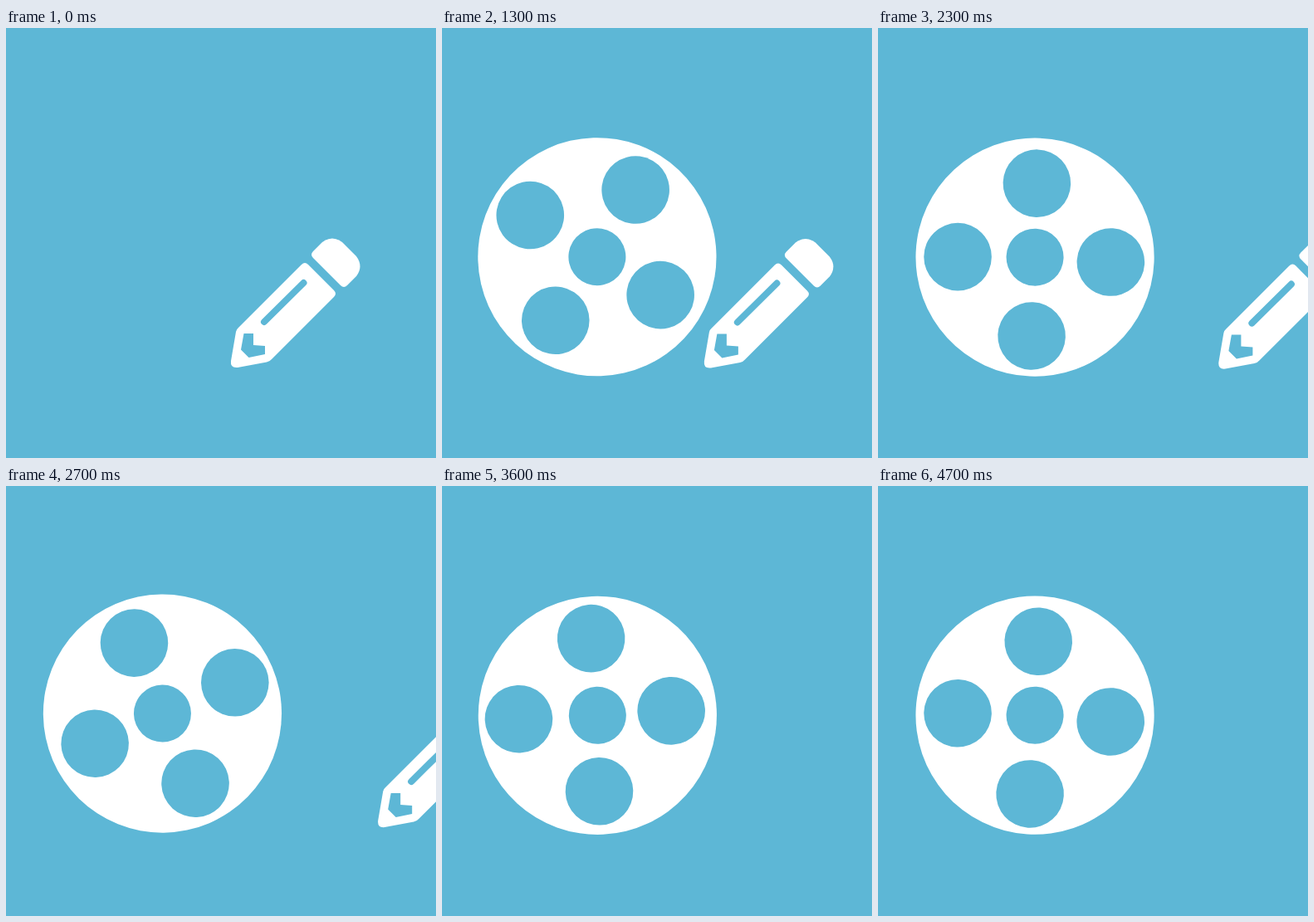
Animation, 518 px wide and 518 px high, one loop 5200 ms. Source, as an HTML page:

```html
<!DOCTYPE html>
<html lang="en">
<head>
<meta charset="utf-8">
<title>Film reel and pencil</title>
<style>
  html, body { margin: 0; width: 100%; height: 100%; overflow: hidden; background: #5db7d6; }
  svg { display: block; width: 100vw; height: 100vh; fill: #fff; }
  .hole { fill: #5db7d6; }
</style>
</head>
<body>
<svg viewBox="0 0 518 518">
  <g id="reel">
    <!-- the disc sits slightly off its pivot, which makes it wobble -->
    <g id="disc" transform="translate(-1 -.8)">
      <circle r="143.6"/>
      <circle class="hole" r="34.5"/>
    </g>
  </g>
  <g id="pencil">
    <path d="M370 277Q366 273 370 269L381 258Q393 249 405 258L422 275Q431 287 422 299L411 310Q407 314 403 310Z"/>
    <path d="M356 285Q360 281 364 285L395 316Q399 320 395 324L320 399Q317.500 402 314 402.500L279 409Q270 410 271 401L277 366Q277.500 363 280 361Z"/>
    <path d="M311 354L358.500 307" stroke="#5db7d6" stroke-width="8" stroke-linecap="round"/>
    <path class="hole" d="M286.500 368H298V382L312 383V393L292.500 397L283 387.500Z"/>
  </g>
</svg>
<script>
const LOOP = 5200, STEP = 100, LAST = 4700;
const reel = document.getElementById('reel');
const disc = document.getElementById('disc');
const pencil = document.getElementById('pencil');

// Outer holes: angle clockwise from the top, distance from the centre
for (const [angle, dist] of [[0, 95], [87.9, 93], [179.1, 89], [271.3, 91.5]]) {
  const hole = document.createElementNS('http://www.w3.org/2000/svg', 'circle');
  hole.setAttribute('class', 'hole');
  hole.setAttribute('r', 40.8);
  hole.setAttribute('cy', -dist);
  hole.setAttribute('transform', `rotate(${angle})`);
  disc.append(hole);
}

// Time in ms, total turn in degrees
const spin = [[800, 1.7], [1700, 542.1], [2300, 902.4], [3100, 1391.4], [4200, 2086.5], [4700, 2343.6]];

const progress = (t, from, to) => Math.min(1, Math.max(0, (t - from) / (to - from)));

function turn(t) {
  let angle = spin[0][1];
  for (let i = 1; i < spin.length; i++) {
    const [t0, a0] = spin[i - 1], [t1, a1] = spin[i];
    angle += (a1 - a0) * progress(t, t0, t1);
  }
  return angle;
}

function draw(now) {
  const t = Math.min(LAST, Math.floor(now % LOOP / STEP) * STEP);
  const x = 0.0945 * Math.max(0, t - 825);
  reel.setAttribute('transform',
    `translate(188.1 275.3) rotate(${turn(t)}) scale(${progress(t, 65, 810)})`);
  pencil.setAttribute('transform', `translate(${x} ${x * 0.0115})`);
}

const start = performance.now();
(function tick() {
  draw(performance.now() - start);
  requestAnimationFrame(tick);
})();
</script>
</body>
</html>
```
